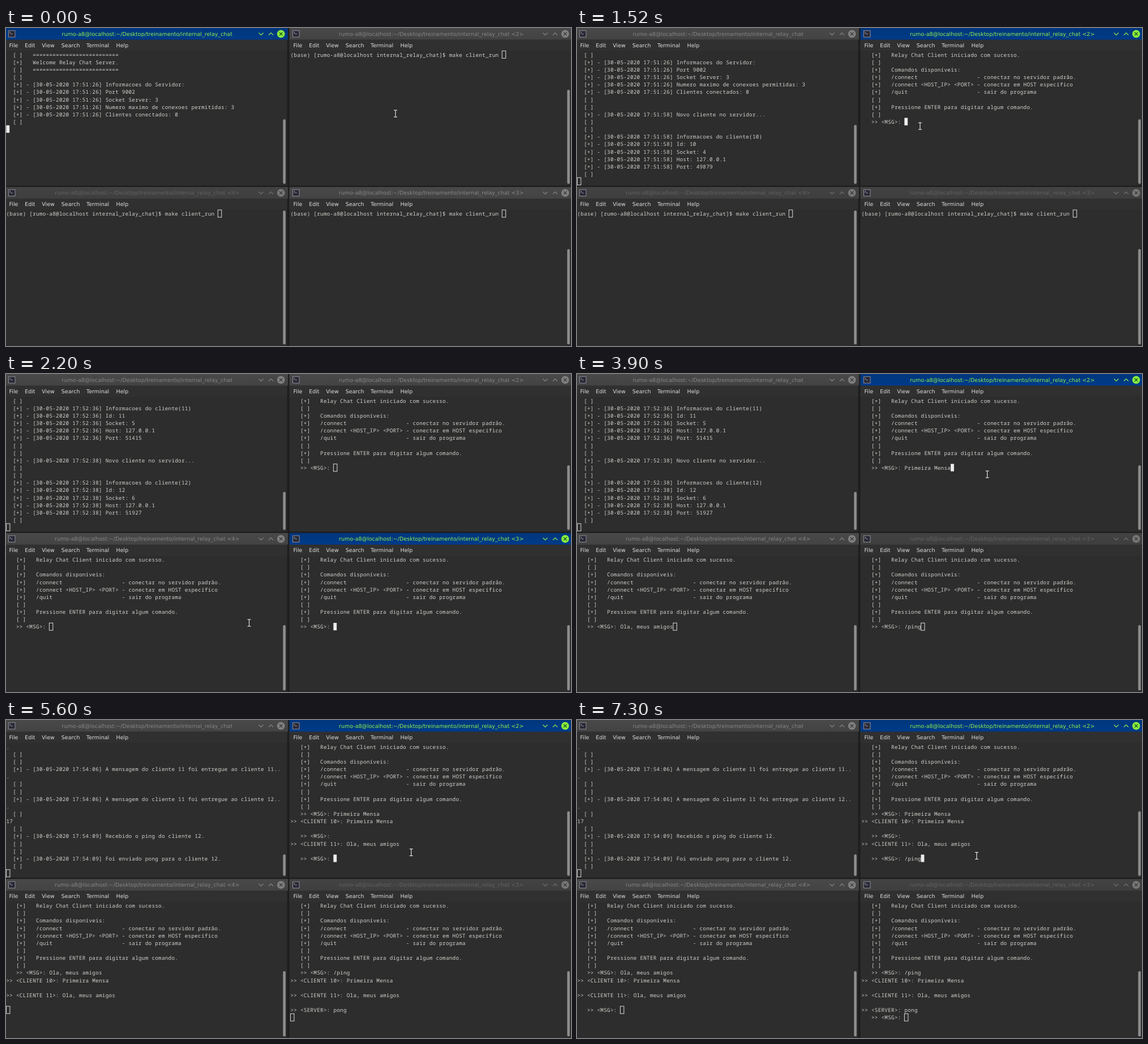
Animation of 998x561 px, one loop 8 s. Source, as an HTML page with a canvas:

```html
<!DOCTYPE html>
<html lang="pt">
<head>
<meta charset="utf-8">
<title>Relay chat terminals</title>
<style>
html, body { margin: 0; width: 100%; height: 100%; overflow: hidden; background: #2d2d2d; }
canvas { display: block; }
</style>
</head>
<body>
<canvas id="stage" width="998" height="561"></canvas>
<script>
const ctx = document.getElementById('stage').getContext('2d');
const LOOP = 8000;
const CELL_W = 5.84, CELL_H = 13.15, TEXT_TOP = 40.4;
const MONO_SIZE = 9.3;
const MONO = MONO_SIZE + 'px "Noto Sans Mono", monospace';
const MONO_GAP = CELL_W - MONO_SIZE * 0.6 + 'px';
const SANS = '9.5px "DejaVu Sans", sans-serif';
const USER = 'rumo-a8@localhost';
const PATH = USER + ':~/Desktop/treinamento/internal_relay_chat';
const MENU = [['File', 5.5], ['Edit', 33.2], ['View', 63.3], ['Search', 97.8], ['Terminal', 142], ['Help', 194.6]];

const PANES = [
  { x: 0, y: 0, title: PATH },
  { x: 502, y: 0, title: PATH + ' <2>' },
  { x: 502, y: 280.5, title: PATH + ' <3>' },
  { x: 0, y: 280.5, title: PATH + ' <4>' }
];
const LOOKS = {
  active: { top: '#00367c', bottom: '#003b88', text: '#8df04f', sign: '#8df04f', disc: '#86ee3e', cross: '#123c1c' },
  normal: { top: '#494949', bottom: '#434343', text: '#868686', sign: '#868686', disc: '#808080', cross: '#333' },
  dim: { top: '#434343', bottom: '#3e3e3e', text: '#626262', sign: '#727272', disc: '#787878', cross: '#333' }
};

// Terminal contents
const gap = '  [ ]';
const log = (time, ...msgs) => msgs.map(m => `  [+] - [30-05-2020 ${time}] ${m}`);
const rule = gap + '   ' + '='.repeat(26);
const prompt = [`(base) [${USER} internal_relay_chat]$ make client_run `];
const server = log('17:51:26', 'Informacoes do Servidor:', 'Port 9002', 'Socket Server: 3',
  'Numero maximo de conexoes permitidas: 3', 'Clientes conectados: 0');
const info = (time, id, socket, port) => log(time, `Informacoes do cliente(${id})`, `Id: ${id}`,
  `Socket: ${socket}`, 'Host: 127.0.0.1', `Port: ${port}`);
const joined = (time, ...who) => [gap, gap, ...log(time, 'Novo cliente no servidor...'), gap, gap,
  ...info(time, ...who), gap, ''];
const delivered = id => [...log('17:54:06', `A mensagem do cliente 11 foi entregue ao cliente ${id}..`), '.'];

const boot = [rule, '  [+]   Welcome Relay Chat Server.', rule, gap, ...server, gap, ''];
const firstJoin = [gap, ...server, ...joined('17:51:58', 10, 4, 49879)];
const allJoined = [gap, ...info('17:52:36', 11, 5, 51415), ...joined('17:52:38', 12, 6, 51927)];
const relayed = ['.', gap, gap, ...delivered(11), gap, gap, ...delivered(12), gap, '17', gap,
  ...log('17:54:09', 'Recebido o ping do cliente 12.'), gap, gap,
  ...log('17:54:09', 'Foi enviado pong para o cliente 12.'), gap, ''];

const item = s => '   [+]   ' + s;
const help = (cmd, what) => item(cmd.padEnd(26) + '- ' + what);
const empty = '   [ ]';
const msg = (s = '') => '   >> <MSG>: ' + s;
const from = (who, s) => `>> <${who}>: ${s}`;
const client = (...tail) => [
  item('Relay Chat Client iniciado com sucesso.'), empty, item('Comandos disponíveis:'),
  help('/connect', 'conectar no servidor padrão.'),
  help('/connect <HOST_IP> <PORT>', 'conectar em HOST específico'),
  help('/quit', 'sair do programa'), empty,
  item('Pressione ENTER para digitar algum comando.'), empty, ...tail];

const first = 'Primeira Mensa', hello = 'Ola, meus amigos';
const fromTen = from('CLIENTE 10', first), fromEleven = from('CLIENTE 11', hello);
const chatA = s => client(msg(first), fromTen, '', msg(), fromEleven, '', msg(s));
const chatB = last => client(msg('/ping'), fromTen, '', fromEleven, '', from('SERVER', 'pong'), last);
const chatC = last => client(msg(hello), fromTen, '', fromEleven, '', last);

// looks: one letter per pane; bars: top of each scrollbar thumb
const SCENES = [
  { at: 0, looks: 'annd', bars: [161, 109, 390, 322], mouse: [688, 151], text: [boot, prompt, prompt, prompt] },
  { at: 500, looks: 'nadd', bars: [171, 161, 390, 322], mouse: [606, 173], text: [firstJoin, client(msg()), prompt, prompt] },
  { at: 2200, looks: 'nnan', bars: [208, 161, 443, 443], mouse: [429.5, 439],
    text: [allJoined, client(msg()), client(msg()), client(msg())] },
  { at: 3900, looks: 'nadn', bars: [208, 161, 443, 443], mouse: [724.7, 177],
    text: [allJoined, client(msg(first)), client(msg('/ping')), client(msg(hello))] },
  { at: 5600, looks: 'nadn', bars: [237, 161, 443, 443], mouse: [715.7, 233.5],
    text: [relayed, chatA(), chatB(''), chatC('')] },
  { at: 7300, looks: 'nadn', bars: [237, 161, 443, 443], mouse: [706, 239.5],
    text: [relayed, chatA('/ping'), chatB(msg()), chatC(msg())] }
];

function box(color, x, y, w, h) {
  ctx.fillStyle = color;
  ctx.fillRect(x, y, w, h);
}

function line(color, width, ...points) {
  ctx.strokeStyle = color;
  ctx.lineWidth = width;
  ctx.beginPath();
  points.forEach(([x, y], i) => i ? ctx.lineTo(x, y) : ctx.moveTo(x, y));
  ctx.stroke();
}

function label(s, x, y, color, font, align = 'left') {
  ctx.font = font;
  ctx.letterSpacing = font === MONO ? MONO_GAP : '0px';
  ctx.textAlign = align;
  ctx.fillStyle = color;
  ctx.fillText(s, x, y);
}

function drawTitle(title, look) {
  const fill = ctx.createLinearGradient(0, 0, 0, 20.5);
  fill.addColorStop(0, look.top);
  fill.addColorStop(1, look.bottom);
  box(fill, -1.5, 0, 499.5, 20.5);
  box('#8d8d99', 4, 4.2, 12.5, 12.3);
  box('#292936', 5, 5.2, 10.5, 10.3);
  line('#c9c9d2', 0.9, [6.5, 7], [8.2, 8.5], [6.5, 10]);
  line('#c9c9d2', 0.9, [9, 10.6], [11.5, 10.6]);
  label(title, 249.2, 13.8, look.text, SANS, 'center');
  line(look.sign, 1.1, [446.5, 8.5], [450.5, 12.5], [454.5, 8.5]);
  line(look.sign, 1.1, [464, 12.5], [468, 8.5], [472, 12.5]);
  ctx.fillStyle = look.disc;
  ctx.beginPath();
  ctx.arc(485.7, 10.4, 6.8, 0, 7);
  ctx.fill();
  line(look.cross, 1.2, [482.9, 7.6], [488.5, 13.2]);
  line(look.cross, 1.2, [488.5, 7.6], [482.9, 13.2]);
}

function drawPane(pane, look, rows, barTop) {
  const active = look === LOOKS.active;
  ctx.save();
  ctx.translate(pane.x, pane.y);
  box('#2d2d2d', -1.5, 20.5, 498, 257.5);
  box('#303030', -1.5, 20.5, 498, 19.5);
  drawTitle(pane.title, look);
  for (const [name, x] of MENU) label(name, x, 33.7, '#dedede', SANS);
  rows.forEach((s, r) => label(s, 0.5, TEXT_TOP + r * CELL_H + 10.2, '#d0d0cb', MONO));

  const cx = 0.4 + rows[rows.length - 1].length * CELL_W;
  const cy = TEXT_TOP + (rows.length - 1) * CELL_H;
  if (active) box('#ececec', cx, cy - 0.2, CELL_W, CELL_H);
  else {
    ctx.strokeStyle = '#dadada';
    ctx.lineWidth = 1;
    ctx.strokeRect(cx + 0.1, cy, CELL_W + 0.6, CELL_H - 0.2);
  }

  const top = barTop - pane.y, bottom = pane.y ? 278 : 275;
  ctx.fillStyle = '#8c8d8d';
  ctx.beginPath();
  ctx.roundRect(489.3, top, 4.6, bottom - top, 2.3);
  ctx.fill();
  ctx.restore();
}

function drawMouse(x, y) {
  for (const [color, width] of [['#151515', 3], ['#ededed', 1.3]]) {
    line(color, width, [x, y - 5.5], [x, y + 5.5]);
    for (const end of [-6, 6]) line(color, width, [x - 3, y + end], [x + 3, y + end]);
  }
}

function draw(scene) {
  ctx.textRendering = 'geometricPrecision';
  box('#1e1e1e', 0, 0, 998, 561);
  PANES.forEach((pane, i) => {
    const look = LOOKS[{ a: 'active', n: 'normal', d: 'dim' }[scene.looks[i]]];
    drawPane(pane, look, scene.text[i], scene.bars[i]);
  });
  box('#2d2d2d', 0, 558, 496.5, 3);
  box('#2d2d2d', 500.5, 558, 497.5, 3);
  drawMouse(...scene.mouse);
}

let shown = null;
function tick() {
  const t = performance.now() % LOOP;
  const scene = SCENES.findLast(s => s.at <= t);
  if (scene !== shown) draw(shown = scene);
  requestAnimationFrame(tick);
}
tick();
</script>
</body>
</html>
```
